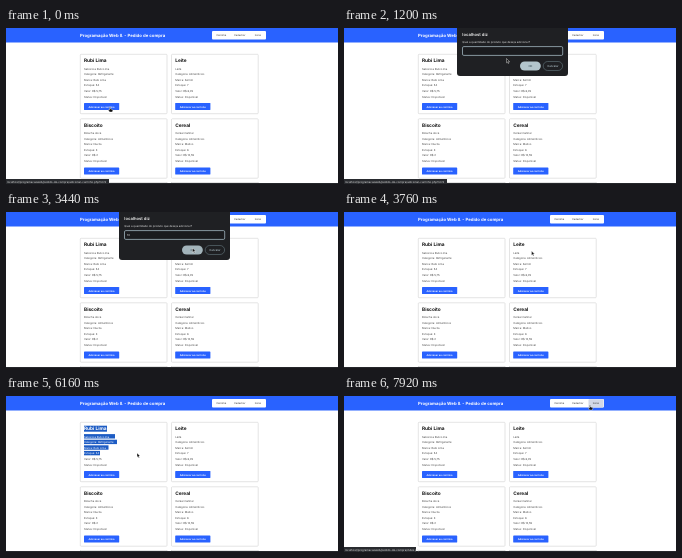
These frames come from a looping animation (332x156 px, 8 s). An HTML page:

```html
<!DOCTYPE html>
<html lang="pt-BR">
<head>
<meta charset="utf-8">
<title>Pedido de compra</title>
<style>
html, body { margin: 0; width: 100%; height: 100%; overflow: hidden; background: #fff; }
svg { display: block; width: 100vw; height: 100vh; }
text { font-family: Inter, "Open Sans", sans-serif; text-rendering: geometricPrecision; }
</style>
</head>
<body>
<svg id="stage" viewBox="0 0 332 156" xmlns="http://www.w3.org/2000/svg"></svg>
<script>
const NS = "http://www.w3.org/2000/svg";
const stage = document.getElementById("stage");
const LOOP = 8000;
const BLUE = "#2962ff";

function add(parent, tag, attrs) {
  const node = document.createElementNS(NS, tag);
  for (const key in attrs) node.setAttribute(key, attrs[key]);
  parent.appendChild(node);
  return node;
}
function box(parent, x, y, width, height, fill, more) {
  return add(parent, "rect", { x, y, width, height, fill, ...more });
}
function label(parent, x, y, size, fill, string, more) {
  const node = add(parent, "text", { x, y, "font-size": size, fill, ...more });
  node.textContent = string;
  return node;
}
const group = parent => add(parent, "g", {});
const show = (node, on) => node.setAttribute("visibility", on ? "visible" : "hidden");

// Page header
box(stage, 0, 0, 332, 156, "#fff");
box(stage, 0, 0, 332, 14.5, BLUE);
label(stage, 74, 8.9, 4.3, "#fff", "Programação Web II. - Pedido de compra", { "font-weight": 700 });
box(stage, 206, 3, 54, 8.6, "#fff", { rx: 1 });
const navHover = box(stage, 244.5, 3.2, 15, 8.2, "#d3d8e6", { rx: 0.8 });
[["Carrinho", 215.2], ["Cadastrar", 233.7], ["Início", 251.8]].forEach(([name, x]) =>
  label(stage, x, 8, 2.45, "#333", name, { "text-anchor": "middle" }));

// Product cards
const products = [
  ["Rubi Lima", "Saborosa Rubi Lima", "Refrigerante", "Rubi Lima", "54", "R$ 5,75"],
  ["Leite", "Leite", "Alimentícios", "Serrim", "7", "R$ 6,05"],
  ["Biscoito", "Bolacha doce", "Alimentícios", "Nuvila", "3", "R$ 2"],
  ["Cereal", "Cereal matinal", "Alimentícios", "Mativo", "6", "R$ 12,55"]
];
const lineY = i => i ? 35.9 + i * 5.6 : 34.4;
const selection = [];

function card(item, index) {
  const g = group(stage);
  g.setAttribute("transform", `translate(${index % 2 * 91.2} ${Math.floor(index / 2) * 64.5})`);
  box(g, 74.3, 26.3, 86.7, 59.4, "#fff", { stroke: "#d2d2d2", "stroke-width": 0.6, rx: 0.8 });
  const [name, about, kind, brand, stock, price] = item;
  const lines = [name, about, "Categoria: " + kind, "Marca: " + brand,
    "Estoque: " + stock, "Valor: " + price, "Status: Disponível"];
  lines.forEach((string, i) => {
    const mark = !index && i < 5
      ? box(g, 78, lineY(i) - (i ? 3.4 : 4.7), [23, 31, 33, 24.5, 16][i], i ? 4.4 : 6, "#1d5cc4")
      : null;
    const text = label(g, 78, lineY(i), i ? 2.7 : 4.75, i ? "#454545" : "#111", string,
      { "font-weight": i ? 400 : 700 });
    if (mark) selection.push({ mark, text, color: i ? "#454545" : "#111" });
  });
  box(g, 78, 74.9, 35.2, 7.2, BLUE, { rx: 0.7 });
  label(g, 95.6, 79.5, 2.5, "#fff", "Adicionar ao carrinho", { "text-anchor": "middle", "font-weight": 600 });
}
products.forEach(card);
for (const x of [74.3, 165.5])
  box(stage, x, 154.4, 86.7, 10, "#fff", { stroke: "#cfcfcf", "stroke-width": 0.6 });
box(stage, 0, 155, 332, 1, "#25272b");

// Browser prompt
const dialog = group(stage);
box(dialog, 113, -5, 111, 53, "#1f2023", { rx: 3 });
label(dialog, 118.3, 8.4, 4.2, "#f2f2f2", "localhost diz", { "font-weight": 600 });
label(dialog, 118.3, 15.1, 2.75, "#dedede", "Qual a quantidade do produto que deseja adicionar?");
box(dialog, 118.5, 18.6, 100.2, 8.8, "#1a1b1e", { rx: 1.3, stroke: "#b4cbd5", "stroke-width": 0.7 });
const typed = label(dialog, 121, 24.1, 2.8, "#eee", "");
const okButton = box(dialog, 176, 33.4, 20.8, 9.2, "#b3c5cc", { rx: 4.6 });
label(dialog, 186.4, 39, 2.7, "#20343d", "OK", { "text-anchor": "middle" });
box(dialog, 199.2, 33.5, 19.4, 9, "none", { rx: 4.5, stroke: "#66777e", "stroke-width": 0.6 });
label(dialog, 208.9, 39, 2.7, "#c7dce4", "Cancelar", { "text-anchor": "middle" });

// Link preview at the bottom left
function preview(width, url) {
  const g = group(stage);
  box(g, 0, 151, width, 5, "#292b2f");
  label(g, 1, 154.5, 2.75, "#e0e0e0", url);
  return g;
}
const cartLink = preview(103, "localhost/programacaoweb/pedido-de-compra/adicionar-carrinho.php?id=5");
const homeLink = preview(72, "localhost/programacaoweb/pedido-de-compra/index.php");

// Pointers, each with its hot spot at 0,0
const pointer = group(stage);
const outline = { fill: "#111", stroke: "#fff", "stroke-width": 0.4, "stroke-linejoin": "round" };
const shapes = {
  arrow: add(pointer, "path", { d: "M0 0V4.3L1 3.4L1.7 5L2.5 4.6L1.8 3.1H3.1Z", ...outline }),
  hand: add(pointer, "path", {
    d: "M-.5 .2Q0 -.4 .5 .2V2L2.4 2.5Q3 2.7 2.8 3.5L2.3 5H-.4L-1.8 3.1Q-1.5 2.3-.5 3Z", ...outline }),
  beam: add(pointer, "path", { d: "M-.9-2.2H.9M0-2.2V2.2M-.9 2.2H.9", fill: "none", stroke: "#111", "stroke-width": 0.6 })
};

// time, x, y
const path = [
  [0, 104, 79], [560, 104, 79], [1040, 162.5, 30.5], [1760, 162.5, 30.5],
  [2560, 186.5, 36], [3600, 186.5, 36], [3760, 187.5, 39], [4000, 186, 41],
  [4960, 111, 71], [5240, 95, 58], [5400, 95, 58], [5800, 79, 33],
  [6160, 131, 57], [6400, 133, 56], [6880, 259, 10], [7200, 253, 8],
  [7600, 246, 9], [8000, 246, 9]
];
function pointerAt(t) {
  const i = path.findIndex(p => p[0] > t);
  const [t0, x0, y0] = path[i - 1], [t1, x1, y1] = path[i];
  const u = (t - t0) / (t1 - t0), k = u * u * (3 - 2 * u);
  return [x0 + (x1 - x0) * k, y0 + (y1 - y0) * k];
}
function pointerShape(t) {
  if (t < 480 || t >= 7120) return "hand";
  return t >= 4880 && t < 5880 ? "beam" : "arrow";
}

function draw(t) {
  const open = t >= 480 && t < 3600;
  show(dialog, open);
  show(cartLink, t < 1600);
  show(homeLink, t >= 7280);
  show(navHover, t >= 7120);
  typed.textContent = t < 2000 ? "" : t < 2240 ? "1" : "10";
  okButton.setAttribute("fill", t >= 2400 ? "#a3b4bb" : "#b3c5cc");

  const [x, y] = pointerAt(t);
  pointer.setAttribute("transform", `translate(${x} ${y})`);
  const shape = pointerShape(t);
  for (const name in shapes) show(shapes[name], name === shape);

  // The drag runs upwards, one line after another
  selection.forEach(({ mark, text, color }, i) => {
    const on = t >= 5440 + (4 - i) * 80 && t < 6480;
    show(mark, on);
    text.setAttribute("fill", on ? "#fff" : color);
  });
}
function tick() {
  draw(performance.now() % LOOP);
  requestAnimationFrame(tick);
}
tick();
</script>
</body>
</html>
```
